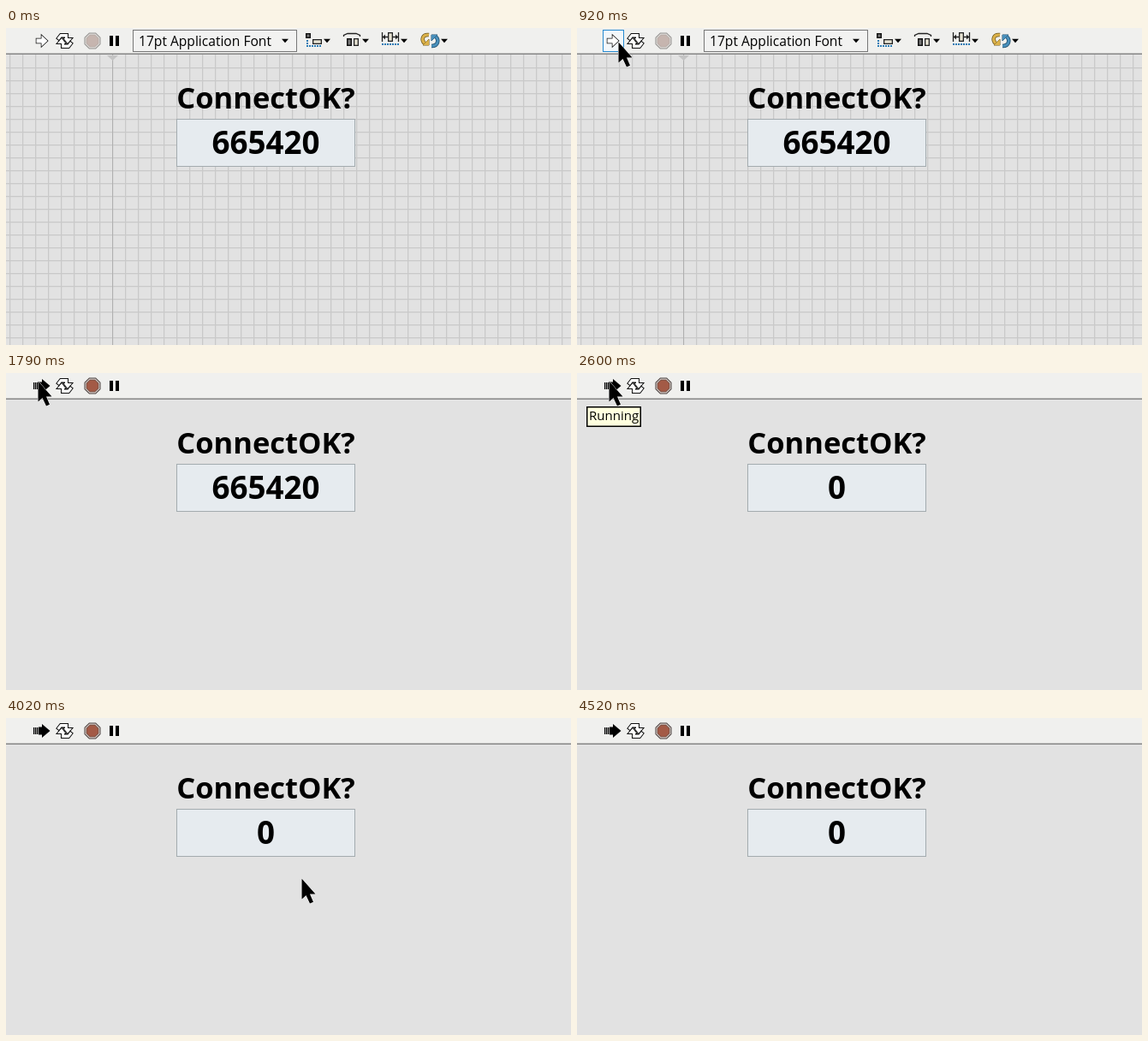
Write an HTML page with a canvas that moves like this. It is 660 px wide and 370 px high and loops after 7.49 s.

```html
<!DOCTYPE html>
<html lang="en">
<head>
<meta charset="utf-8">
<title>Front panel</title>
<style>
  html, body { margin: 0; width: 100%; height: 100%; overflow: hidden; background: #e2e2e2; }
  canvas { display: block; }
</style>
</head>
<body>
<canvas id="stage" width="660" height="370"></canvas>
<script>
const ctx = document.getElementById('stage').getContext('2d');
const LOOP = 7490;
const FONT = '"Open Sans", "Noto Sans", sans-serif';

const CURSOR = 'M.5 .5V24.5L5.5 20 10 29.5 14 27.8 10 18.5H16.5Z';
const RUN_IDLE = 'M35.5 12.5H41.5V8.5L48.5 15 41.5 21.5V17.5H35.5Z';
const RUN_BUSY = 'M38 10.5H42V7L51.5 15 42 23V19.5H38Z';
const LOOP_ARROW = 'M-9 -3L-5 -8H3.5V-3H8.5L3.5 3 -1 -3H.5V-4.5H-4L-6.5 -1Z';

// Pointer keys: time, x, y; the last flag marks an eased stretch to the next key.
const POINTER = [
  [300, 446, 314, true], [920, 48, 16], [1000, 38, 9], [1050, 37, 9], [1250, 37, 9],
  [3769, 37, 9], [3770, 78, 33, true], [4270, 547, 303], [4370, 557, 330], [4470, 556, 355]
];

function rect(x, y, w, h, fill, stroke, width = 1) {
  if (fill) { ctx.fillStyle = fill; ctx.fillRect(x, y, w, h); }
  if (stroke) {
    ctx.strokeStyle = stroke;
    ctx.lineWidth = width;
    ctx.strokeRect(x + width / 2, y + width / 2, w - width, h - width);
  }
}

function shape(d, fill, stroke, width = 1) {
  const path = new Path2D(d);
  if (stroke) { ctx.strokeStyle = stroke; ctx.lineWidth = width; ctx.stroke(path); }
  if (fill) { ctx.fillStyle = fill; ctx.fill(path); }
}

function at(x, y, draw, scale = 1, angle = 0) {
  ctx.save();
  ctx.translate(x, y);
  ctx.rotate(angle);
  ctx.scale(scale, scale);
  draw();
  ctx.restore();
}

function text(s, x, y, size, weight = 500, align = 'left') {
  ctx.font = `${weight} ${size}px ${FONT}`;
  ctx.textAlign = align;
  ctx.fillStyle = '#000';
  ctx.fillText(s, x, y);
}

function octagon(radius, fill) {
  ctx.beginPath();
  for (let i = 0; i < 8; i++) {
    const a = (i + 0.5) * Math.PI / 4;
    ctx.lineTo(101 + radius * Math.cos(a), 15 + radius * Math.sin(a));
  }
  ctx.fillStyle = fill;
  ctx.fill();
}

function drawGrid() {
  for (let x = 4; x < 660; x += 15) rect(x, 31, 1.3, 339, '#c9c9c9');
  for (let y = 46; y < 370; y += 15) rect(0, y, 660, 1.3, '#c9c9c9');
  rect(124, 31, 1, 339, '#b0b0b0');
  shape('M118 32H131L124.5 38Z', '#c4c4c4');
}

function dots(x, y, dx, dy, count) {
  for (let i = 0; i < count; i++) rect(x + i * dx, y + i * dy, 2, 2, '#287bb5');
}

function drawFontAndLayoutTools() {
  rect(148, 2, 192, 26, '#f2f2f1', '#777');
  text('17pt Application Font', 155, 20.5, 15.6);
  for (const x of [326, 375, 420, 465, 512]) shape(`M${x - 4} 12.8H${x + 4}L${x} 17.3Z`, '#000');

  // align
  rect(350, 6, 6, 6, '#777', '#111', 1.5);
  dots(351, 14, 0, 3, 3);
  dots(354, 20, 3, 0, 5);
  rect(358, 13, 11, 6, '#e8e4d4', '#222', 1.3);

  // distribute
  shape('M394.5 10V8.5L399 6.5H409L413.5 8.5V10', null, '#222', 1.3);
  rect(398, 12, 6, 9, '#777', '#111', 1.5);
  rect(406, 12, 6, 9, '#e8e4d4', '#222', 1.3);

  // resize
  shape('M439.5 5V16M458.5 5V16M440 10.5H446M452 10.5H458', null, '#222', 1.3);
  shape('M443 7.5V13.5L440 10.5ZM455 7.5V13.5L458 10.5Z', '#222');
  rect(446, 5, 6, 11, '#e8e4d4', '#222', 1.3);
  dots(439, 18, 3, 0, 7);

  // reorder
  shape('M494 8C486 7 485 14 489 18', null, '#6b5620', 4.5);
  shape('M494 8C486 7 485 14 489 18', null, '#dcb24a', 3);
  shape('M487 20H494V13Z', '#dcb24a', '#6b5620');
  shape('M497 21C505 21 506 14 502 10', null, '#1d4a68', 4.5);
  shape('M497 21C505 21 506 14 502 10', null, '#4a90bb', 3);
  shape('M504 8H497V15Z', '#4a90bb', '#1d4a68');
}

function drawToolbar(running, hover) {
  rect(0, 0, 660, 30, '#f0f0ee');
  rect(0, 29.5, 660, 1.5, '#858585');
  if (hover) rect(30, 2, 25, 26, '#f3f7fa', '#2589d0');

  if (running) {
    for (const x of [32, 34, 36]) rect(x, 11, 1.3, 8, '#000');
    shape(RUN_BUSY, '#000');
  } else {
    shape(RUN_IDLE, '#fff', '#111', 1.5);
  }
  for (const angle of [0, Math.PI]) {
    at(68.5, 15, () => shape(LOOP_ARROW, '#fff', '#111', 2), 1, angle);
  }
  const stopSign = running
    ? ['#4c4442', '#d5cac5', '#6b4a40', '#a35a46']
    : ['#949290', '#dedbd8', '#b3a8a3', '#c6b5af'];
  [10.3, 9.2, 7.9, 7.1].forEach((radius, i) => octagon(radius, stopSign[i]));
  rect(121, 9, 4, 12, '#000');
  rect(128, 9, 4, 12, '#000');
  if (!running) drawFontAndLayoutTools();
}

function drawTooltip(s, x, w) {
  rect(x, 39, w, 24, '#ffffdf', '#000', 1.5);
  text(s, x + 3, 55, 15);
}

function ease(u) {
  const startSlope = 0.75, endSlope = 0.2;
  return startSlope * u * (1 - u) ** 2 + u * u * (3 - 2 * u) + endSlope * u * u * (u - 1);
}

function pointerAt(time) {
  // The pointer is refreshed every 50 ms.
  const t = Math.max(300, Math.floor((time - 20) / 50) * 50 + 20);
  const next = POINTER.findIndex(key => key[0] > t);
  if (next < 0) return POINTER[POINTER.length - 1].slice(1, 3);
  const [t0, x0, y0, eased] = POINTER[next - 1];
  const [t1, x1, y1] = POINTER[next];
  const u = (t - t0) / (t1 - t0);
  const k = eased ? ease(u) : u;
  return [Math.round(x0 + (x1 - x0) * k), Math.round(y0 + (y1 - y0) * k)];
}

function drawPressedPointer() {
  ctx.save();
  ctx.globalCompositeOperation = 'multiply';
  ctx.fillStyle = '#fff766';
  ctx.beginPath();
  ctx.arc(36.5, 12, 14.5, 0, 2 * Math.PI);
  ctx.fill();
  ctx.restore();
  at(36, 8, () => shape(CURSOR, '#fff04a', '#6b6220', 2.5), 0.42);
}

function draw(t) {
  const running = t >= 1790;
  const pressed = t >= 1660 && !running;
  const visible = t >= 300 && t < 4520;
  const [x, y] = pointerAt(t);
  const hover = visible && !running && x < 55 && y < 28;

  rect(0, 0, 660, 370, '#e2e2e2');
  if (!running) drawGrid();
  drawToolbar(running, hover);

  text('ConnectOK?', 303.5, 94, 34.5, 700, 'center');
  rect(199, 106, 209, 56, '#e6ebef', '#a3abaf');
  text(t < 2240 ? '665420' : '0', 303.5, 147, 36.8, 700, 'center');

  if (t >= 2600 && t < 3770) drawTooltip('Running', 11, 64);
  if (t >= 3770 && t < 3840) drawTooltip('Run Continuously', 3, 130);
  if (pressed) drawPressedPointer();
  else if (visible) at(x, y, () => shape(CURSOR, '#000', '#fff'));
}

const start = performance.now();
function frame() {
  draw((performance.now() - start) % LOOP);
  requestAnimationFrame(frame);
}
frame();
</script>
</body>
</html>
```
